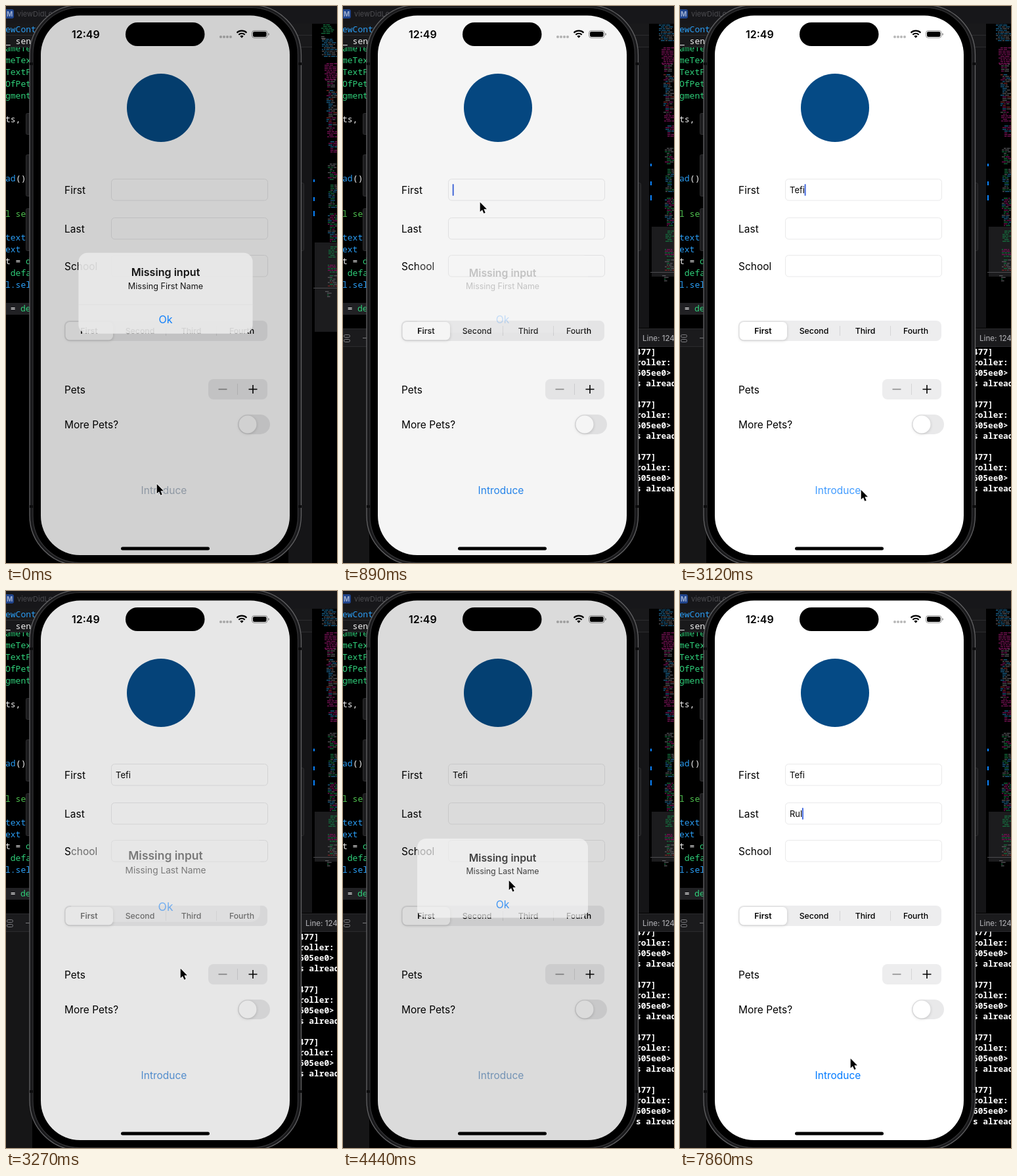
Write an HTML page that moves like this. It is 504 by 848 pixels and loops after 8 s.

```html
<!DOCTYPE html>
<html lang="en">
<head>
<meta charset="utf-8">
<title>Form alert demo</title>
<style>
  html, body { margin: 0; width: 100%; height: 100%; overflow: hidden; background: #000; }
  svg { display: block; width: 100vw; height: 100vh; font-family: Inter, sans-serif; }
  text { white-space: pre; }
  .mid { text-anchor: middle; }
  .mono { font: 500 13px "Noto Sans Mono", monospace; }
  .log { font: 700 12.8px "Noto Sans Mono", monospace; fill: #fff; }
  .label { font-size: 15.5px; }
  .input { font-size: 13px; }
  .seg { font-size: 12.3px; font-weight: 500; }
  .field { fill: #fff; stroke: #e9e9ea; }
  .gray { fill: #ededee; }
  .rule { stroke: #d4d4d6; }
  .soft { filter: drop-shadow(0 1.5px 2px rgba(0, 0, 0, .18)); }
</style>
</head>
<body>
<svg viewBox="0 0 504 848">
  <defs>
    <clipPath id="mapClip"><rect id="mapArea" x="466" y="27" width="38" height="821"/></clipPath>
    <clipPath id="logClip"><rect x="440" y="518.5" width="64" height="330"/></clipPath>
    <clipPath id="screenClip"><rect x="53" y="14.5" width="379" height="821.5" rx="60"/></clipPath>
  </defs>

  <!-- editor behind the phone -->
  <rect width="504" height="848"/>
  <rect y="452" width="40" height="18" fill="#212124"/>
  <g id="code" class="mono"></g>
  <rect y="27" width="466" height="35.5" fill="#19191b"/>
  <g id="head" class="mono"></g>
  <rect x="430" y="62" width="36" height="786" fill="#151517"/>
  <path d="M0 44.5H40M0 62.5H40M440 44.5H466M440 62.5H466" stroke="#2c2c2f"/>
  <rect width="504" height="27" fill="#17171a"/>
  <rect x="-2" y="5" width="14" height="14" rx="3" fill="#20448c"/>
  <text x="1" y="16" font-size="10" font-weight="700" fill="#9fb0d0">M</text>
  <text x="17" y="16" font-size="11" fill="#4c4c50">viewDidLoad</text>
  <g clip-path="url(#mapClip)">
    <g id="map">
      <rect id="view" x="470" y="360" width="34" height="136" fill="#1c1c1e"/>
      <path d="M468 429.5H504" stroke="#4c4c4f"/>
      <path d="M469 264v4M469 291v6M469 312v8" stroke="#0a84ff" stroke-width="2"/>
    </g>
  </g>
  <g id="debug">
    <rect y="490" width="504" height="358"/>
    <rect y="518" width="40" height="330" fill="#161617"/>
    <rect y="491" width="504" height="27.5" fill="#1b1b1d"/>
    <path d="M0 491.5H504M0 518.5H504" stroke="#2b2b2e"/>
    <g fill="none" stroke="#7c7c80">
      <rect x="1.5" y="500.5" width="9" height="4" rx="2"/>
      <rect x="1.5" y="507.5" width="9" height="4" rx="2"/>
      <path d="M30 505.5h6"/>
    </g>
    <text x="456" y="510" font-size="11.5" font-weight="500" fill="#a4a4a8">Line: 124</text>
    <g clip-path="url(#logClip)"><g id="log" class="log"></g></g>
  </g>

  <!-- phone body -->
  <g fill="#1c1c1e" stroke="#2e2e30">
    <rect x="30.5" y="163.5" width="8" height="32" rx="2"/>
    <rect x="30.5" y="226.5" width="8" height="63" rx="2"/>
    <rect x="30.5" y="308.5" width="8" height="64" rx="2"/>
    <rect x="446.5" y="269.5" width="7" height="103" rx="2"/>
  </g>
  <rect x="36" y="-1.5" width="413.5" height="853" rx="76" fill="#1a1a1c" stroke="#626264" stroke-width="1.3"/>
  <rect x="41" y="2.5" width="403.5" height="845" rx="71" stroke="#343436" stroke-width="1.2"/>
  <path d="M36 88h5M36 762h5M445 88h5M445 762h5" stroke="#0c0c0d" stroke-width="4"/>

  <!-- app screen -->
  <g clip-path="url(#screenClip)">
    <rect x="53" y="14" width="379" height="823" fill="#fff"/>
    <circle cx="236" cy="155" r="52" fill="#054a85"/>

    <g class="label">
      <text x="89" y="286">First</text>
      <text x="89" y="345">Last</text>
      <text x="89" y="402">School</text>
      <text x="89" y="590">Pets</text>
      <text x="89" y="643">More Pets?</text>
      <text id="intro" class="mid" x="240.5" y="743">Introduce</text>
    </g>
    <rect class="field" x="160.5" y="263.5" width="238" height="32.5" rx="5"/>
    <rect class="field" x="160.5" y="322.5" width="238" height="32.5" rx="5"/>
    <rect class="field" x="160.5" y="379.5" width="238" height="32.5" rx="5"/>
    <g class="input">
      <text id="first" x="167" y="284.5"></text>
      <text id="last" x="167" y="343.5"></text>
    </g>
    <g fill="#456be0">
      <rect id="firstCaret" y="271" width="2" height="18" rx="1"/>
      <rect id="lastCaret" y="330" width="2" height="18" rx="1"/>
    </g>

    <rect class="gray" x="89" y="479" width="309" height="31" rx="8"/>
    <rect class="soft" x="90.5" y="481" width="72.5" height="27.5" rx="6.5" fill="#fff"/>
    <path class="rule" d="M243.5 487v15M320.5 487v15"/>
    <g class="seg mid">
      <text x="126.5" y="499" font-weight="600">First</text>
      <text x="204" y="499">Second</text>
      <text x="282" y="499">Third</text>
      <text x="359" y="499">Fourth</text>
    </g>

    <rect class="gray" x="308" y="568" width="90" height="31" rx="8"/>
    <path class="rule" d="M352.5 575v17"/>
    <path d="M323.5 583.5h13" stroke="#8c8c8e" stroke-width="1.6"/>
    <path d="M369.5 583.5h13M376 577v13" stroke="#000" stroke-width="1.6"/>
    <rect x="353" y="622" width="49" height="30" rx="15" fill="#e9e9ea"/>
    <circle class="soft" cx="368" cy="637" r="13.5" fill="#fff"/>

    <rect id="dim" x="53" y="14" width="379" height="823"/>

    <text x="100" y="48.5" font-size="16" font-weight="600">12:49</text>
    <rect x="182" y="25" width="120.5" height="36" rx="18"/>
    <g fill="#000" fill-opacity=".28">
      <circle cx="327" cy="47" r="2"/><circle cx="332" cy="47" r="2"/>
      <circle cx="337" cy="47" r="2"/><circle cx="342" cy="47" r="2"/>
    </g>
    <path d="M351.5 40.7a10.8 10.8 0 0 1 15 0M354.3 43.7a6.8 6.8 0 0 1 9.4 0" fill="none" stroke="#000" stroke-width="2.1"/>
    <path d="M359 48.8l-2.6-2.7a3.7 3.7 0 0 1 5.2 0z"/>
    <rect x="374.5" y="37.5" width="23.5" height="11" rx="3.5" fill="none" stroke="#000" stroke-opacity=".4"/>
    <rect x="376" y="39" width="20.5" height="8" rx="2.2"/>
    <path d="M399.3 41v4q1.7-.6 1.7-2t-1.7-2z" fill-opacity=".45"/>
    <rect x="175" y="823.5" width="135" height="5" rx="2.5"/>

    <g id="alert" class="mid">
      <rect id="panel" x="113" y="377" width="260" height="120.5" rx="13.5"/>
      <path id="press" d="M113 454.5H373V484a13.5 13.5 0 0 1-13.5 13.5H126.5A13.5 13.5 0 0 1 113 484z" fill="#d9dbdb"/>
      <path id="split" d="M113 454.5H373" stroke="#c9cbcb"/>
      <text x="243" y="412" font-size="15.8" font-weight="600">Missing input</text>
      <text id="detail" x="243" y="431" font-size="12.4"></text>
      <text x="243" y="482.5" font-size="15.8" fill="#007aff">Ok</text>
    </g>
  </g>

  <path id="cursor" d="M.7 .7V15.3L4 12.2 6.4 17.7 8.7 16.7 6.4 11.3H11Z" stroke="#fff" stroke-width="1.6" stroke-linejoin="round" paint-order="stroke"/>
</svg>

<script>
const LOOP = 8000, TICKS = 54;
const $ = id => document.getElementById(id);
const set = (id, attrs) => { for (const k in attrs) $(id).setAttribute(k, attrs[k]); };

function add(parent, tag, attrs, text = '') {
  const el = document.createElementNS('http://www.w3.org/2000/svg', tag);
  for (const k in attrs) el.setAttribute(k, attrs[k]);
  el.textContent = text;
  $(parent).append(el);
}

// Source code at the left edge: baseline, colour, text
const GREEN = '#2fd07a', BLUE = '#2a9df4', WHITE = '#f2f2f2', NOTE = '#4fc04f';
const codeLine = (group, y, x, fill, text) => add(group, 'text', { x, y, fill }, text);
[[69, GREEN, 'ameText'], [87, GREEN, 'meTextF'], [105, GREEN, 'TextFie'], [123, GREEN, 'OfPetsL'],
 [141, GREEN, 'gmentCo'], [177, WHITE, 'ts, mo'], [267, BLUE, 'ad'], [321, NOTE, 'l sele'],
 [357, BLUE, 'text'], [375, BLUE, 'ext'], [393, WHITE, 't ='], [411, GREEN, ' defau'],
 [429, BLUE, 'l.sele'], [465, WHITE, ' =']].forEach(([y, c, s]) => codeLine('code', y, -1, c, s));
codeLine('code', 267, 15, WHITE, '()');
codeLine('code', 393, 30, GREEN, 'de');
codeLine('code', 465, 22, GREEN, 'defa');
codeLine('head', 40, -1, BLUE, 'ewContr');
codeLine('head', 58, -1, WHITE, '_ sender');

// Minimap: bands of dashed rows (top, bottom, indent, longest row, colours)
let seed = 7;
const rand = () => (seed = seed * 16807 % 2147483647) / 2147483647;
const G = '#146f3e', C = '#1c638c', M = '#7a1257', W = '#58585c', R = '#7c2626';
[[28, 42, 480, 18, [G]], [46, 50, 480, 5, [W]], [50, 76, 481, 23, [C, C, W]], [87, 112, 485, 22, [M]],
 [112, 124, 486, 14, [M, W]], [128, 186, 488, 16, [W, M, C, R]], [188, 200, 489, 16, [M]],
 [206, 222, 491, 13, [M, M, C]], [240, 264, 490, 14, [G, W, M]], [272, 308, 491, 13, [W, C, G]],
 [316, 358, 490, 14, [G, C, M, W]], [366, 384, 491, 15, [G]], [394, 406, 490, 14, [G, M]],
 [410, 426, 490, 14, [R, W, G]], [434, 442, 486, 8, [G, W]]]
.forEach(([top, bottom, x0, length, colors]) => {
  for (let y = top; y < bottom; y += 2.6) {
    const end = x0 + length * (.5 + rand() / 2);
    for (let x = x0 + Math.floor(rand() * 2) * 3, width; x < end; x += width + 1) {
      width = 2 + rand() * 5;
      add('map', 'rect', { x, y, width, height: 1.3, fill: colors[Math.floor(rand() * colors.length)] });
    }
  }
});

for (let i = 0; i < 4; i++)
  ['477]', 'roller:', '605ee0>', 's already'].forEach((s, j) =>
    add('log', 'text', { x: 446, y: 531 + i * 80 + j * 16 }, s));

// Key lists hold [tick, value, ...]; values are interpolated between keys
const CURSOR = [[0, 229, 727], [1, 232, 700], [2, 243, 560], [3, 246, 480], [4, 246, 478], [6, 208, 298],
  [17, 208, 298], [18, 212, 340], [19, 235, 520], [20, 268, 715], [21, 275, 736], [22, 265, 574],
  [23, 256, 490], [25, 254, 473], [27, 257, 461], [28, 257, 461], [29, 252, 440], [30, 240, 385],
  [31, 230, 352], [32, 228, 347], [47, 228, 347], [48, 230, 365], [49, 240, 480], [50, 260, 620],
  [51, 269, 700], [52, 264, 712], [53, 259, 711]];
const ALERT = [[0, .9], [1, 1], [4, 1], [5, .6], [6, .2], [7, 0], [21, 0], [22, .47], [23, .82],
  [24, .97], [25, 1], [28, 1], [29, .7], [30, .3], [31, .06], [32, 0]];
const TAP = [[19, 1], [20, .3], [21, .75], [22, 1]];
const FIRST_CARET = [[5, 0], [6, 1], [8, 1], [9, .4], [10, 0], [11, .5], [12, 1], [21, 1], [22, 0],
  [33, 0], [34, .4], [35, 1], [37, 1], [38, 0]];
const LAST_CARET = [[37, 0], [38, 1], [41, 1], [42, .25], [43, 1], [47, 1], [48, .4], [49, 0],
  [50, 0], [51, .4], [52, 1]];

function track(keys, t) {
  const i = keys.findIndex(k => k[0] > t);
  if (i < 1) return (i ? keys[keys.length - 1] : keys[0]).slice(1);
  const a = keys[i - 1], b = keys[i], p = (t - a[0]) / (b[0] - a[0]);
  return a.slice(1).map((v, j) => v + (b[j + 1] - v) * p);
}

function typed(id, word, count, caret) {
  $(id).textContent = word.slice(0, Math.max(0, count));
  const x = 166.7 + (count > 0 ? $(id).getComputedTextLength() : 0);
  set(id + 'Caret', { x, opacity: caret });
}

function draw(t) {
  const [x, y] = track(CURSOR, t), [a] = track(ALERT, t);
  set('cursor', { transform: `translate(${x} ${y})` });

  const open = t >= 1;
  set('debug', { visibility: open ? 'visible' : 'hidden' });
  set('map', { transform: `translate(0 ${open ? -24 : 0})` });
  set('view', { height: open ? 76 : 136 });
  set('mapArea', { height: open ? 463 : 821 });
  set('log', { transform: `translate(0 ${t < 23 ? 0 : -7})` });
  $('log').querySelectorAll('text').forEach((el, i) =>
    el.setAttribute('visibility', open && (i < 12 || t >= 23) ? 'visible' : 'hidden'));

  const leaving = t > 4 && t < 8 || t > 28;
  const scale = leaving ? 1 : 1.2 - .2 * a;
  const shade = leaving ? 245 : 231 + 10 * a ** 12;
  set('dim', { opacity: .2 * a });
  set('alert', { opacity: a, transform: `translate(243 437.5) scale(${scale}) translate(-243 -437.5)` });
  set('panel', { fill: `rgb(${shade},${shade},${shade})` });
  set('split', { opacity: leaving ? 0 : a ** 12 });
  set('press', { opacity: t === 4 || t >= 26 && t <= 28 ? 1 : 0 });
  $('detail').textContent = `Missing ${t < 15 ? 'First' : 'Last'} Name`;

  const mix = (from, to) => from + (to - from) * a;
  set('intro', { fill: `rgb(${mix(0, 190)},${mix(122, 190)},${mix(255, 191)})`, opacity: track(TAP, t)[0] });

  typed('first', 'Tefi', t - 11, track(FIRST_CARET, t)[0]);
  typed('last', 'Rul', t < 43 ? 0 : t < 45 ? 1 : 3, track(LAST_CARET, t)[0]);
}

const start = performance.now();
function frame() {
  const ms = (performance.now() - start) % LOOP;
  draw(Math.floor(ms * TICKS / LOOP));
  requestAnimationFrame(frame);
}
frame();
</script>
</body>
</html>
```
